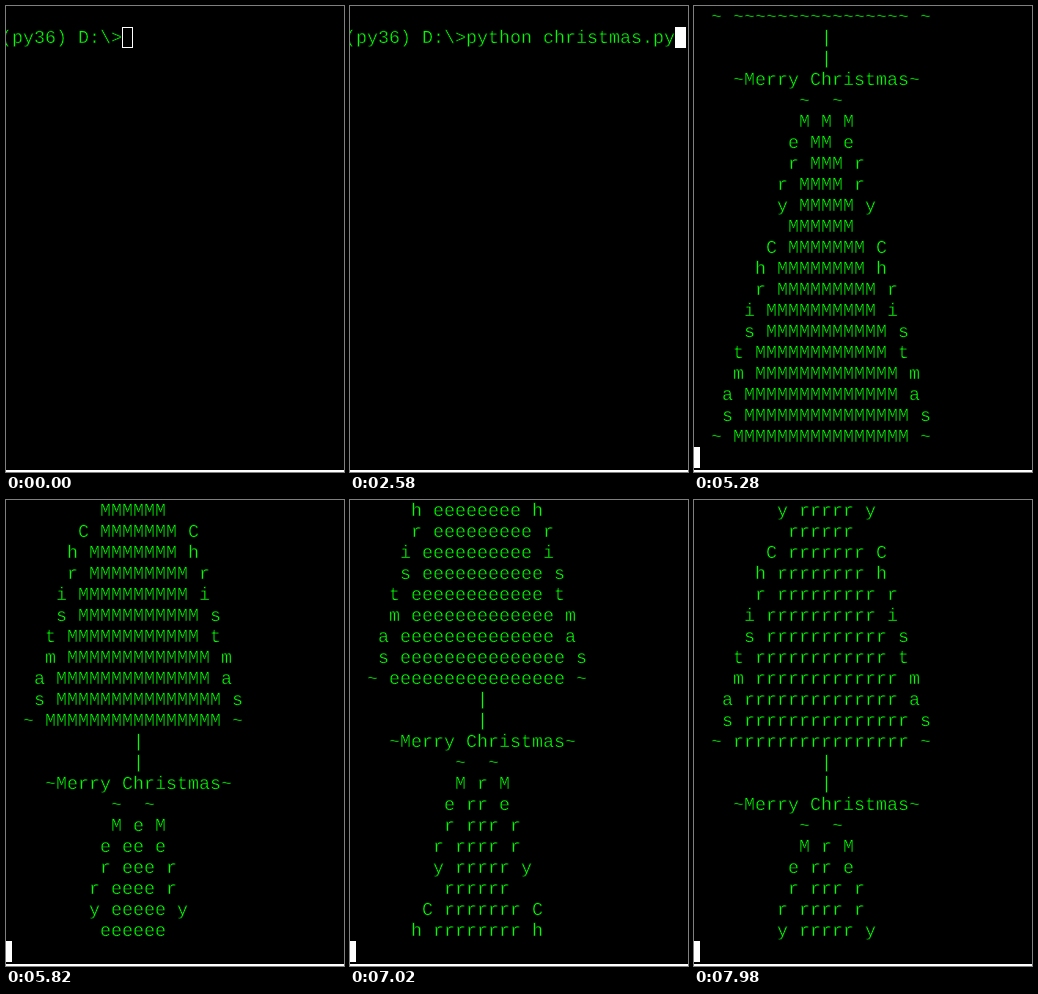
Recreate the animation shown at these times as an HTML page. Size 338 by 466 pixels, loop 8000 ms.

```html
<!DOCTYPE html>
<html lang="en">
<head>
<meta charset="utf-8">
<title>Terminal tree</title>
<style>
  html, body { margin: 0; width: 100%; height: 100%; overflow: hidden; background: #000; }
  svg { display: block; width: 338px; height: 466px; }
  /* The black outline thins the letters to a fine console weight. */
  text {
    font: 18.33px "Liberation Mono", "Courier New", monospace;
    fill: #0f0;
    stroke: #000;
    stroke-width: 0.4px;
    white-space: pre;
    text-rendering: geometricPrecision;
  }
</style>
</head>
<body>
<svg id="stage" viewBox="0 0 338 466">
  <rect width="338" height="466" fill="#000"/>
  <g id="rows"></g>
  <rect id="cursor" stroke="#fff"/>
  <rect y="464" width="338" height="2" fill="#fff"/>
</svg>
<script>
const LOOP = 8000, TICK = 60;
const CELL = 11, LINE = 21, LEFT = -5, BASELINE = 16, ROWS = 22;
const PROMPT = "(py36) D:\\>", COMMAND = "python christmas.py";
const GREETING = "Merry Christmas", TREE_LINES = 20;
const FOCUS_AT = 240, ENTER_AT = 3180;

// Bursts of key presses: [first ms, gap ms, count]
const BURSTS = [[660, 120, 3], [960, 60, 3], [1260, 0, 1], [1440, 120, 2], [1860, 60, 8], [2460, 120, 2]];
const keyTimes = BURSTS.flatMap(([start, gap, count]) =>
  Array.from({ length: count }, (_, i) => start + i * gap));

const cursor = document.getElementById("cursor");
const rows = Array.from({ length: ROWS }, (_, i) => {
  const row = document.createElementNS("http://www.w3.org/2000/svg", "text");
  row.setAttribute("x", LEFT);
  row.setAttribute("y", i * LINE + BASELINE);
  return document.getElementById("rows").appendChild(row);
});

function treeLine(index) {
  const n = index % TREE_LINES;
  const tree = Math.floor(index / TREE_LINES);
  if (n === 0) return " ".repeat(10) + "~  ~";
  if (n === 19) return "    ~" + GREETING + "~";
  if (n > 16) return " ".repeat(12) + "|";
  const fill = tree ? GREETING[tree - 1] : "~";
  const side = GREETING[n - 1] || "~";
  return " ".repeat(10 - Math.floor(n / 2)) + `${side} ${fill.repeat(n)} ${side}`;
}

function printedLines(t) {
  if (t < ENTER_AT) return 0;
  const tick = Math.floor((t - ENTER_AT) / TICK);
  return Math.max(0, Math.floor((tick - 20) * 13 / 12 + 21.42));
}

function placeCursor(col, row, solid) {
  const attrs = {
    x: LEFT + col * CELL + 0.5, y: row * LINE + 0.5,
    width: CELL - 1, height: LINE - 1,
    fill: solid ? "#fff" : "none"
  };
  for (const name in attrs) cursor.setAttribute(name, attrs[name]);
}

function render(t) {
  const typed = keyTimes.filter(time => time <= t).length;
  const printed = printedLines(t);
  const scroll = Math.max(0, printed + 3 - ROWS);
  const command = PROMPT + COMMAND.slice(0, typed);

  rows.forEach((row, i) => {
    const line = i + scroll - 2;
    const text = line === -1 ? command : line >= 0 && line < printed ? treeLine(line) : "";
    if (row.textContent !== text) row.textContent = text;
  });

  if (t < ENTER_AT) placeCursor(command.length, 1, t >= FOCUS_AT);
  else placeCursor(0, printed + 2 - scroll, true);
}

const start = performance.now();
function frame() {
  render((performance.now() - start) % LOOP);
  requestAnimationFrame(frame);
}
render(0);
requestAnimationFrame(frame);
</script>
</body>
</html>
```
